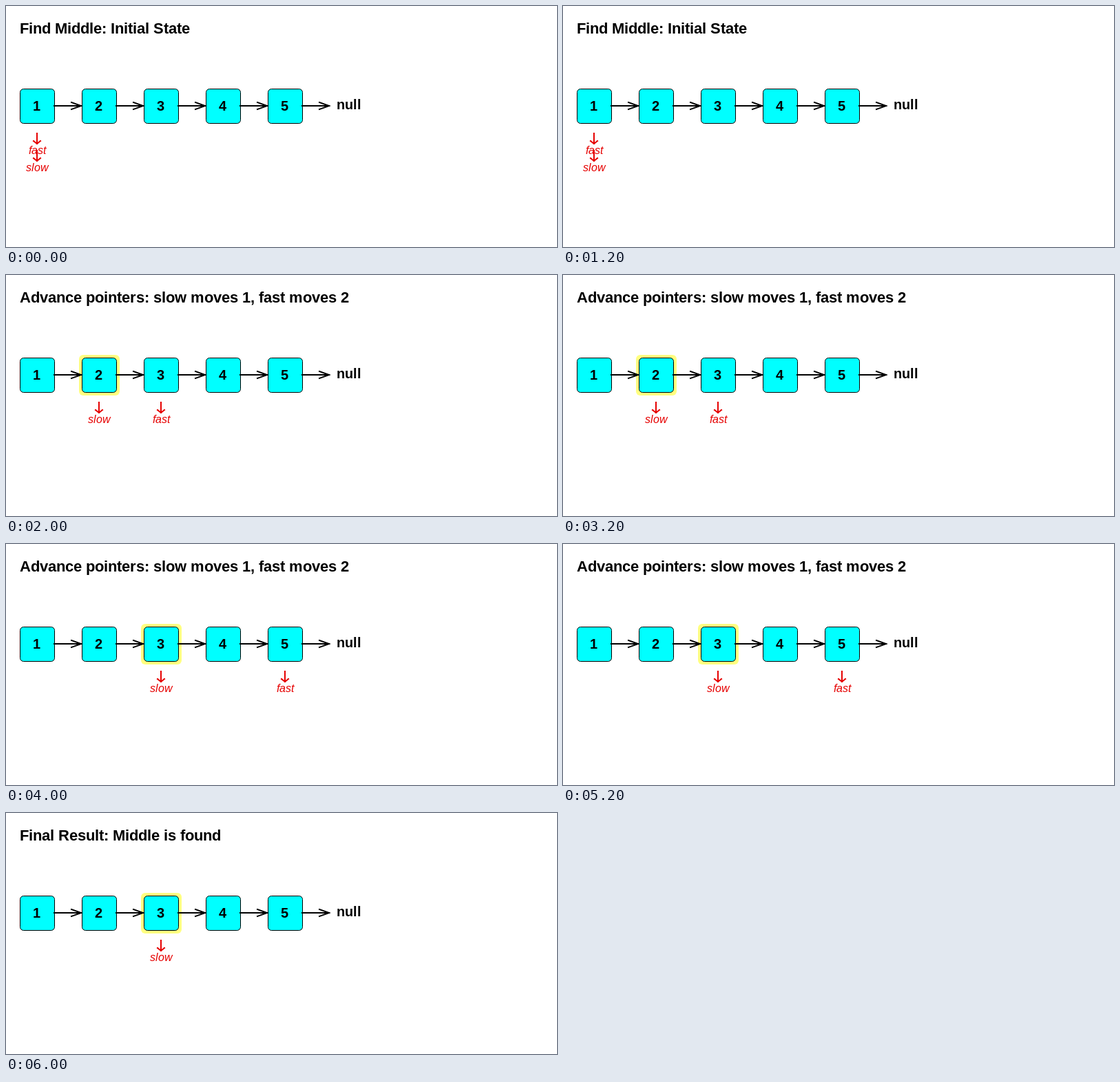
Recreate the animation shown at these times as an HTML page with a canvas. Size 800 px wide and 350 px high, loop 8000 ms.

```html
<!DOCTYPE html>
<html lang="en">
<head>
<meta charset="utf-8">
<title>Find Middle</title>
<style>
  html, body { margin: 0; width: 100%; height: 100%; overflow: hidden; background: #fff; }
  canvas { display: block; }
</style>
</head>
<body>
<canvas id="stage" width="800" height="350"></canvas>
<script>
const ctx = document.getElementById('stage').getContext('2d');
const SANS = '"Liberation Sans", Arial, sans-serif';
const STEP = 2000, NODES = 5, SIZE = 50, GAP = 90, LEFT = 20, TOP = 120;
const RED = '#e60000';
const ADVANCE = 'Advance pointers: slow moves 1, fast moves 2';
const steps = [
  { title: 'Find Middle: Initial State', fast: 0, slow: 0 },
  { title: ADVANCE, fast: 2, slow: 1, mark: 1 },
  { title: ADVANCE, fast: 4, slow: 2, mark: 2 },
  { title: 'Final Result: Middle is found', slow: 2, mark: 2 }
];

const nodeX = i => LEFT + i * GAP;
const advance = c => Math.round(ctx.measureText(c).width);

// Glyphs sit on whole pixels.
function text(str, x, y, font, color = '#000', centered = false) {
  ctx.font = `${font} ${SANS}`;
  ctx.fillStyle = color;
  if (centered) x -= Math.floor([...str].reduce((w, c) => w + advance(c), 0) / 2);
  for (const c of str) {
    ctx.fillText(c, x, y);
    x += advance(c);
  }
}

function arrow(x, y, angle, length, headLength, headWidth, color) {
  ctx.save();
  ctx.translate(x, y);
  ctx.rotate(angle);
  ctx.strokeStyle = color;
  ctx.lineWidth = 2;
  ctx.lineCap = 'square';
  ctx.beginPath();
  ctx.moveTo(0, 0);
  ctx.lineTo(length - 1, 0);
  ctx.moveTo(length - headLength, -headWidth);
  ctx.lineTo(length - 1, 0);
  ctx.lineTo(length - headLength, headWidth);
  ctx.stroke();
  ctx.restore();
}

function box(x, y, size, radius, fill, stroke) {
  ctx.beginPath();
  ctx.roundRect(x, y, size, size, radius);
  ctx.fillStyle = fill;
  ctx.fill();
  if (!stroke) return;
  ctx.strokeStyle = stroke;
  ctx.lineWidth = 1;
  ctx.stroke();
}

function pointer(label, index, y) {
  const x = nodeX(index) + SIZE / 2;
  arrow(x, y, Math.PI / 2, 16, 5, 5, RED);
  text(label, x, y + 30, 'italic 16px', RED, true);
}

function draw({ title, fast, slow, mark }) {
  ctx.fillStyle = '#fff';
  ctx.fillRect(0, 0, 800, 350);
  text(title, LEFT, 40, 'bold 22px');

  if (mark !== undefined) box(nodeX(mark) - 4, TOP - 4, SIZE + 9, 6, '#ffff80');
  for (let i = 0; i < NODES; i++) {
    box(nodeX(i) + 0.5, TOP + 0.5, SIZE, 5, '#0ff', '#000');
    text(String(i + 1), nodeX(i) + 19, 152, 'bold 20px');
  }
  for (let i = 0; i < NODES; i++) {
    arrow(nodeX(i) + SIZE, TOP + SIZE / 2, 0, GAP - SIZE, 15, 5, '#000');
  }
  text('null', nodeX(NODES) + 10, 150, 'bold 20px');

  if (fast !== undefined) pointer('fast', fast, 185);
  pointer('slow', slow, fast === slow ? 210 : 185);
}

const start = performance.now();
function tick(now) {
  const elapsed = Math.max(0, now - start);
  draw(steps[Math.floor(elapsed / STEP) % steps.length]);
  requestAnimationFrame(tick);
}
tick(start);
</script>
</body>
</html>
```
